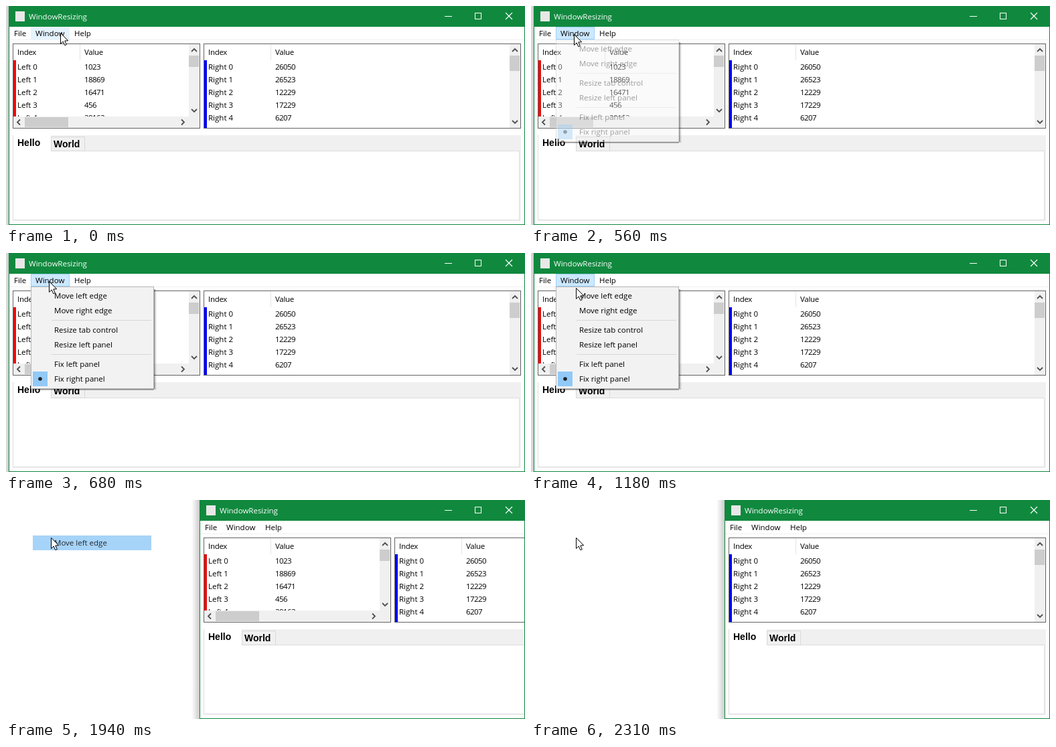
An HTML page with a canvas that plays this animation: 775 by 327 pixels, repeating every 2490 ms.

```html
<!DOCTYPE html>
<html lang="en">
<head>
<meta charset="utf-8">
<title>Window resizing</title>
<style>
html, body { margin: 0; width: 100%; height: 100%; overflow: hidden; background: #fff; }
canvas { display: block; }
</style>
</head>
<body>
<canvas id="stage" width="775" height="327"></canvas>
<script>
const ctx = document.getElementById('stage').getContext('2d');
const W = 775, H = 327, LOOP = 2490, SHIFT = 285;
const GREEN = '#10893e', GREY = '#f0f0f0', THUMB = '#cdcdcd', BLUE = '#91c9f7';
const UI = '11.5px "Open Sans", "Noto Sans", sans-serif';
const BOLD = 'bold 14px "Liberation Sans", Arial, sans-serif';

const LEFT = [1023, 18869, 16471, 456, 20163];
const RIGHT = [26050, 26523, 12229, 17229, 6207, 418];
const ITEMS = [['Move left edge', 53], ['Move right edge', 75], ['Resize tab control', 104],
  ['Resize left panel', 126], ['Fix left panel', 155], ['Fix right panel', 177]];

const progress = (t, a, b) => Math.min(1, Math.max(0, (t - a) / (b - a)));
const ease = p => p * p * (3 - 2 * p);

function rect(color, x, y, w, h) {
  ctx.fillStyle = color;
  ctx.fillRect(x, y, w, h);
}

function frame(color, x, y, w, h) {
  ctx.strokeStyle = color;
  ctx.lineWidth = 1;
  ctx.strokeRect(x + .5, y + .5, w - 1, h - 1);
}

function text(str, x, y, color = '#000', font = UI, spacing = 0) {
  ctx.font = font;
  ctx.letterSpacing = spacing + 'px';
  ctx.fillStyle = color;
  ctx.fillText(str, x, y);
}

function line(color, width, ...pts) {
  ctx.strokeStyle = color;
  ctx.lineWidth = width;
  ctx.beginPath();
  pts.forEach(([x, y]) => ctx.lineTo(x, y));
  ctx.stroke();
}

function clipped(x, y, w, h, draw) {
  ctx.save();
  ctx.beginPath();
  ctx.rect(x, y, w, h);
  ctx.clip();
  draw();
  ctx.restore();
}

// Scroll arrow centred on x, y and pointing along dx, dy
function chevron(x, y, dx, dy) {
  line('#505050', 1.8,
    [x - 2 * dx + 4 * dy, y - 2 * dy + 4 * dx],
    [x + 2 * dx, y + 2 * dy],
    [x - 2 * dx - 4 * dy, y - 2 * dy - 4 * dx]);
}

function panel(x, w, name, values, color, thumb, hasBottomBar) {
  const end = hasBottomBar ? 165 : 182, bar = x + w - 17;
  rect('#fff', x, 56, w, 127);
  clipped(x + 1, 57, w - 2, end - 57, () => {
    text('Index', x + 7, 73, '#000', UI, -.3);
    text('Value', x + 107, 73, '#000', UI, -.3);
    rect('#e5e5e5', x + 100, 57, 1, 24);
    rect(color, x + 1, 81, 4, 102);
    values.forEach((v, i) => {
      text(name + ' ' + i, x + 7, 95 + 19 * i);
      text(v, x + 107, 95 + 19 * i, '#000', UI, -.57);
    });
  });
  rect(GREY, bar, 57, 16, 125);
  rect(THUMB, bar, 74, 15, thumb);
  chevron(bar + 8, 66, 0, -1);
  chevron(bar + 8, end - 9, 0, 1);
  if (hasBottomBar) {
    rect(GREY, x + 1, 165, w - 2, 17);
    rect(THUMB, x + 18, 166, 65, 15);
    chevron(x + 9, 173.5, -1, 0);
    chevron(bar - 9, 173.5, 1, 0);
  }
  frame('#646464', x, 56, w, 127);
}

function tabs(x, w) {
  rect(GREY, x, 193, w, 128);
  rect('#fff', x, 216, w - 2, 104);
  frame('#dcdcdc', x, 216, w - 2, 104);
  frame('#d9d9d9', x + 57, 195, 51, 22);
  rect('#fff', x, 193, 57, 24);
  rect('#dcdcdc', x, 193, 1, 24);
  text('Hello', x + 7, 209, '#000', BOLD);
  text('World', x + 61, 211, '#000', BOLD);
}

function appWindow(dx, collapsed, tabWidth, highlight) {
  const x = 4 + dx;
  const shadow = ctx.createLinearGradient(x - 12, 0, x, 0);
  shadow.addColorStop(0, 'rgba(0,0,0,0)');
  shadow.addColorStop(1, 'rgba(0,0,0,.2)');
  rect(shadow, x - 12, 0, 12, H);
  rect('#fff', x, 0, W - x, H);
  rect(GREEN, x, 0, W - x, 31);
  rect('#e8e8e8', x + 10, 8, 14, 15);
  text('WindowResizing', x + 30, 20, '#fff');
  rect('#fff', 655, 15, 11, 1);
  frame('#fff', 700, 10, 10, 10);
  line('#fff', 1.1, [746, 10], [756, 20]);
  line('#fff', 1.1, [756, 10], [746, 20]);

  if (highlight) {
    rect(highlight > 1 ? '#cce8ff' : '#e5f3ff', x + 33, 31, 58, 19);
    if (highlight > 1) frame('#99d1ff', x + 33, 31, 58, 19);
  }
  text('File', x + 8, 45);
  text('Window', x + 40, 45);
  text('Help', x + 98, 45);
  rect(GREY, x, 50, W - x, 1);

  clipped(x, 51, W - 1 - x, H - 52, () => {
    if (collapsed) panel(295, 474, 'Right', RIGHT, '#00f', 23);
    else {
      panel(10 + dx, 280, 'Left', LEFT, '#e80c0c', 17, true);
      panel(295 + dx, 474, 'Right', RIGHT, '#00f', 23);
    }
    tabs(10 + dx, tabWidth);
  });
  rect(GREEN, x, 31, 1, H);
  rect(GREEN, W - 1, 31, 1, H);
  rect(GREEN, x, H - 1, W - x, 1);
}

function menu(alpha, selected) {
  for (let i = 0; i < 4; i++) {
    const c = `rgba(0,0,0,${[.42, .25, .12, .05][i]})`;
    rect(c, 221 + i, 54, 1, 149 + Math.min(i, 1));
    if (i < 2) rect(c, 41, 203 + i, 180, 1);
  }
  ctx.globalAlpha = alpha;
  rect('#f2f2f2', 37, 50, 184, 153);
  frame('#b4b4b4', 37, 50, 184, 153);
  rect('#d7d7d7', 68, 100, 149, 1);
  rect('#d7d7d7', 68, 151, 149, 1);
  if (selected) rect(BLUE, 40, 53, 177, 22);
  rect(BLUE, 40, 177, 22, 22);
  ctx.fillStyle = '#222';
  ctx.beginPath();
  ctx.arc(51, 188, 2.8, 0, 7);
  ctx.fill();
  ITEMS.forEach(([label, y]) => text(label, 72, y + 15));
  ctx.globalAlpha = 1;
}

function cursor(t) {
  let x, y;
  if (t < 990) {
    const p = ease(progress(t, 160, 440));
    x = 81 - 17 * p;
    y = 40 + 2 * p;
  } else {
    const p = ease(progress(t, 970, 1180));
    x = 64 + 3 * p;
    y = t < 1250 ? 42 + 10 * p : t < 1400 ? 53 : t < 1660 ? 55 : 56;
  }
  ctx.save();
  ctx.translate(Math.round(x) + .5, Math.round(y) + .5);
  ctx.beginPath();
  [[0, 0], [0, 16], [3.7, 12.5], [6.3, 18.2], [8.8, 17.2], [6.3, 11.5], [11.2, 11.3]]
    .forEach(p => ctx.lineTo(...p));
  ctx.closePath();
  ctx.fillStyle = '#fff';
  ctx.fill();
  ctx.strokeStyle = '#000';
  ctx.lineWidth = 1;
  ctx.stroke();
  ctx.restore();
}

function draw(t) {
  rect('#fff', 0, 0, W, H);
  if (t < 1940) {
    appWindow(0, false, 759, t < 470 ? 1 : 2);
    if (t >= 490) menu(progress(t, 490, 680), t >= 1250);
  } else {
    const moved = t >= 1960;
    appWindow(SHIFT, moved, moved ? 474 : 759, 0);
    ctx.globalAlpha = .81 * (1 - progress(t, 1940, 2310));
    rect(BLUE, 40, 53, 177, 22);
    text('Move left edge', 72, 68);
    ctx.globalAlpha = 1;
  }
  cursor(t);
}

const start = performance.now();
function tick() {
  draw((performance.now() - start) % LOOP);
  requestAnimationFrame(tick);
}
tick();
</script>
</body>
</html>
```
